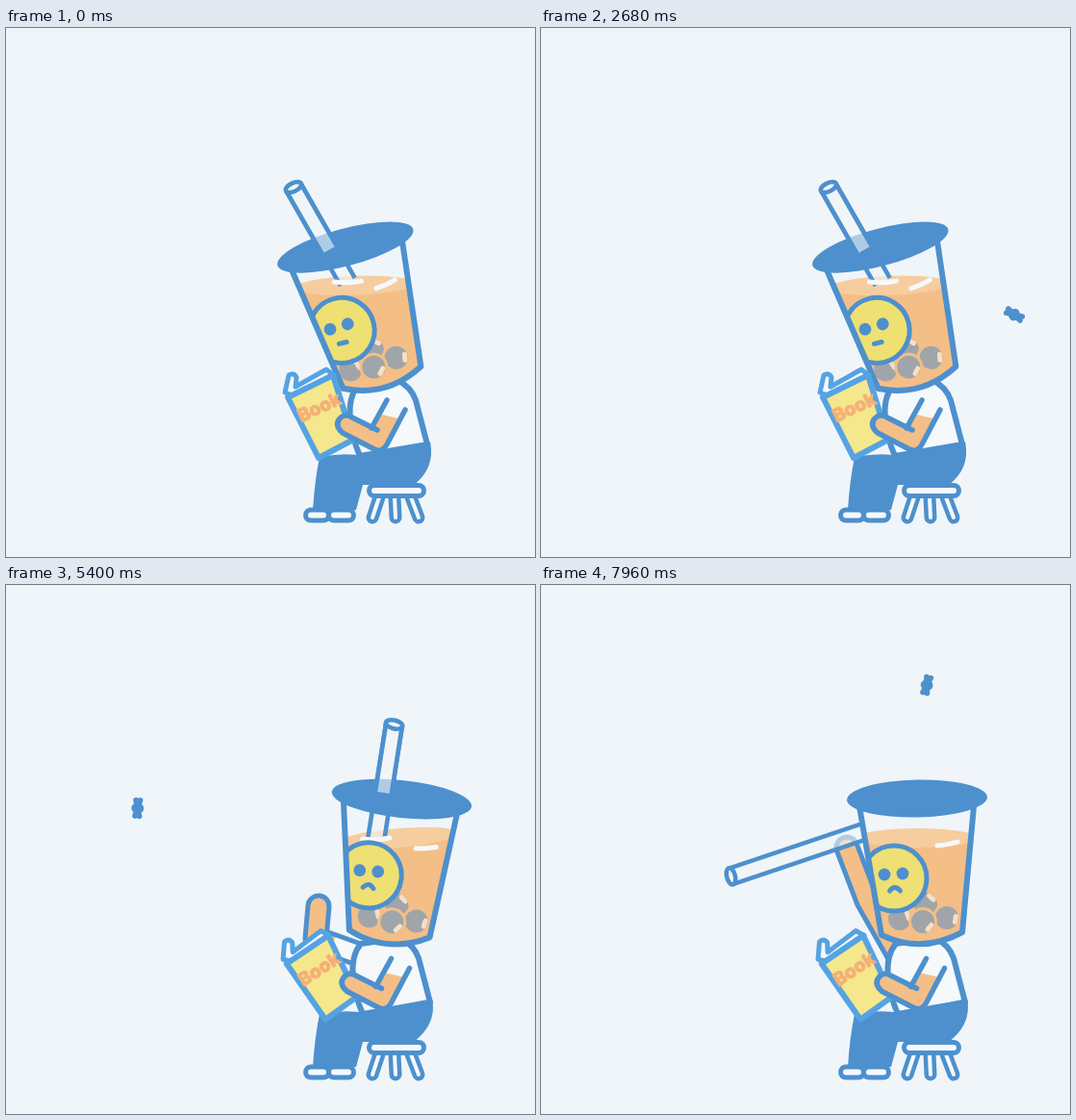
These frames come from a looping animation (550x550 px, 8 s). An HTML page with a canvas:

```html
<!DOCTYPE html>
<html lang="en">
<head>
<meta charset="utf-8">
<title>Bubble tea reader</title>
<style>
  html, body { margin: 0; height: 100%; overflow: hidden; background: #f0f5f9; }
  canvas { display: block; width: 100vw; height: 100vh; }
</style>
</head>
<body>
<canvas width="550" height="550"></canvas>
<script>
const ctx = document.querySelector('canvas').getContext('2d');
const LOOP = 8000;
const BG = '#f0f5f9', BLUE = '#4d90cd', SKY = '#55a3e2', SKIN = '#f4be87',
      FOAM = '#f6cd9f', WHITE = '#f5f9fc', LEMON = '#eee072', PAPER = '#f5e78c',
      PEARL = '#a0a5a9', LETTER = '#f5b077';
const STRAW_LENGTH = 145;
const WALL = 'M331 230L354 364Q396 384 438 361L450 230';

// Waypoints of the fly: time, x, y
const FLIGHT = [
  [0, -28, 330], [1800, 484, 204], [2240, 541, 250], [2680, 492, 298],
  [3000, 525, 275], [3400, 448, 242], [3920, 387, 257], [5400, 137, 232],
  [6100, 37, 235], [6520, 127, 258], [7580, 342, 77], [7960, 401, 104], [8300, 450, 104]];

// Raised arm: hand x, hand y, elbow x, elbow y
const ARM = {
  rest: [335, 402, 332, 404],
  wave: [316, 338, 315, 370],
  open: [325, 334, 322, 368],
  grab: [374, 205, 364, 290],
  aside: [318, 273, 339, 328],
};

const rad = deg => deg * Math.PI / 180;
const mix = (a, b, u) => a + (b - a) * u;
const blend = (a, b, u) => a.map((v, i) => mix(v, b[i], u));

function ramp(t, start, end) {
  const u = Math.max(0, Math.min(1, (t - start) / (end - start)));
  return u * u * (3 - 2 * u);
}

function flyAt(t) {
  const i = FLIGHT.findIndex((p, n) => n && t < p[0]) - 1;
  const at = n => FLIGHT[Math.max(0, Math.min(FLIGHT.length - 1, n))];
  const a = at(i), b = at(i + 1), span = b[0] - a[0], u = (t - a[0]) / span;
  const slope = (n, k) => (at(n + 1)[k] - at(n - 1)[k]) / (at(n + 1)[0] - at(n - 1)[0]) * span;
  return [1, 2].map(k =>
    a[k] * (1 + 2 * u) * (1 - u) ** 2 + slope(i, k) * u * (1 - u) ** 2 +
    b[k] * u * u * (3 - 2 * u) - slope(i + 1, k) * u * u * (1 - u));
}

function paint(shape, fill, stroke, width = 6) {
  const path = typeof shape === 'string' ? new Path2D(shape) : shape;
  if (fill) { ctx.fillStyle = fill; ctx.fill(path); }
  if (stroke) { ctx.strokeStyle = stroke; ctx.lineWidth = width; ctx.stroke(path); }
}

function tube(path, outer, inner, fill) {
  paint(path, null, BLUE, outer);
  paint(path, null, fill, inner);
}

function oval(x, y, rx, ry = rx, turn = 0) {
  const path = new Path2D();
  path.ellipse(x, y, rx, ry, rad(turn), 0, 7);
  return path;
}

function layer(draw) { ctx.save(); draw(); ctx.restore(); }

function rotateAbout(x, y, deg) {
  ctx.translate(x, y);
  ctx.rotate(rad(deg));
  ctx.translate(-x, -y);
}

function poseAt(t) {
  const turn = ramp(t, 4350, 5440), lift = ramp(t, 6560, 6950), swing = ramp(t, 6950, 7480);
  const tilt = -13.7 + 21 * turn - 7.3 * ramp(t, 5720, 7300);
  const slosh = -6 * ramp(t, 5000, 5400) * (1 - ramp(t, 5450, 6300));

  // The straw turns in the lid until it is pulled out, then around the gripping hand
  const angle = mix(mix(-29.8, 9.1, turn), -108.6, swing);
  const dir = [Math.sin(rad(angle)), -Math.cos(rad(angle))];
  const c = Math.cos(rad(tilt)), s = Math.sin(rad(tilt));
  const hole = [397 - 25.5 * c + 173 * s, 384 - 25.5 * s - 173 * c];
  const grip = blend(hole.map((v, i) => v + dir[i] * (72 * lift - 60)), [316, 263], swing);
  const tip = grip.map((v, i) => v + dir[i] * 125);

  const reach = ramp(t, 5960, 6400);
  let arm = blend(ARM.rest, ARM.wave, ramp(t, 3480, 3880));
  arm = blend(arm, ARM.open, turn);
  arm = blend(arm, ARM.grab, reach);
  arm[1] -= 40 * lift;
  arm = blend(arm, ARM.aside, swing);
  if (swing) arm[1] += 40 * lift * 0;
  return { turn, tilt, slosh, angle, tip, arm, reach, inserted: t < 6950 };
}

function drawFly(t) {
  const [x, y] = flyAt(t), [nextX, nextY] = flyAt(t + 1);
  layer(() => {
    ctx.translate(x, y);
    ctx.rotate(Math.atan2(nextY - y, nextX - x));
    paint(oval(0, 0, 6.5, 5.5), BLUE);
    paint('M-2.3 -8.2L2.3 8.2M2.3 -8.2L-2.3 8.2', null, BLUE, 5.6);
  });
}

function drawRaisedArm({ arm: [hx, hy, ex, ey], reach }) {
  const sx = 372, sy = 386, sleeve = mix(.65, .1, reach);
  tube(`M${sx} ${sy}L${ex} ${ey}L${hx} ${hy}`, 27, 17, SKIN);
  ctx.lineCap = 'butt';
  paint(`M${sx} ${sy}L${mix(sx, ex, sleeve)} ${mix(sy, ey, sleeve)}`, null, WHITE, 17);
  ctx.lineCap = 'round';
}

function drawStraw({ tip, angle }, length, withRim) {
  layer(() => {
    ctx.translate(...tip);
    ctx.rotate(rad(angle));
    ctx.lineCap = 'butt';
    paint(`M-8.5 0H8.5V${length}H-8.5Z`, 'rgba(240,245,249,.6)');
    paint(`M-8.5 0V${length}M8.5 0V${length}`, null, BLUE, 4.6);
    if (withRim) paint(oval(0, 0, 8.8, 4.4, 4), BG, BLUE, 4.6);
  });
}

function drawBody(turn) {
  layer(() => {
    ctx.translate(3 * turn, turn);
    paint('M366 372C352 388 357 420 368 445L438 433L426 387Q421 373 407 366Z', WHITE, BLUE, 6);
  });
  const hip = 441 + 2 * turn;
  paint(`M326 446Q352 441 374 445L${hip} 430C${hip + 4} 450 438 464 424 475L371 475L364 501H319Q321 470 326 446Z`, BLUE);
  tube('M317 506.5H330', 16, 6, WHITE);
  tube('M341 506.5H356', 16, 6, WHITE);
  tube('M388 488L381 509M404 488L405 509M421 488L429 509', 13, 4, WHITE);
  tube('M383 481H429', 16, 6, WHITE);
}

function drawMilk(tilt, slosh) {
  layer(() => {
    ctx.translate(391, 263);
    ctx.rotate(rad(slosh - tilt * .85));
    paint('M-95 0H95V150H-95Z', SKIN);
    paint(oval(0, 0, 63, 10), FOAM);
  });
  layer(() => {
    ctx.translate(Math.min(0, tilt * .5), 0);
    [[400, 332], [373, 347], [422, 346], [397, 350]].forEach(([x, y], i) => {
      paint(oval(x, y, 13.5), PEARL, SKIN, 3);
      layer(() => {
        ctx.translate(x, y);
        ctx.rotate(rad(30 * i - 50));
        paint('M9 -3V3', null, '#f7dfc6', 5);
      });
    });
  });
  paint('M412 271Q424 270 433 267', null, WHITE, 5);
}

function drawFace(turn) {
  const look = 1.5 * (turn - 1), half = mix(4, 5.5, turn);
  paint(oval(367, 305, 34), LEMON, BLUE, 5);
  paint(oval(357 + look, 301, 6.4), BLUE);
  paint(oval(376 + look, 300, 6.4), BLUE);
  layer(() => {
    ctx.translate(mix(365, 368, turn), 318);
    paint(`M${-half} 0Q0 ${-7 * turn} ${half} 0`, null, BLUE, 5);
  });
}

function drawCup(pose) {
  const { turn, tilt, slosh, tip, angle, inserted } = pose;
  const inHead = draw => layer(() => { rotateAbout(397, 384, tilt); draw(); });
  const insideCup = draw => layer(() => { ctx.clip(new Path2D(WALL + 'Z')); draw(); });
  const lengthTo = y => Math.max(0, Math.min(STRAW_LENGTH, (y - tip[1]) / Math.cos(rad(angle))));

  inHead(() => insideCup(() => drawMilk(tilt, slosh)));
  if (inserted) {
    const depth = lengthTo(264);
    drawStraw(pose, depth, false);
    if (depth < STRAW_LENGTH) {
      const x = tip[0] - depth * Math.sin(rad(angle));
      paint(`M${x - 14} 264Q${x} 266 ${x + 14} 263`, null, WHITE, 5);
    }
  }
  inHead(() => {
    insideCup(() => drawFace(turn));
    paint(WALL, null, BLUE, 6);
    paint(oval(391, 222, 73, 19.5, -1.2), BLUE);
  });
  if (inserted) drawStraw(pose, lengthTo(221 - .7 * tilt), true);
}

function drawBook(turn) {
  layer(() => {
    ctx.translate(6 * turn, 2 * turn);
    rotateAbout(345, 440, -8 * turn);
    paint('M290 379L294 361Q299 358 302 363L301 373L333 355L341 361L301 383Z', WHITE, SKY, 5);
    paint('M293 384L340 361L361 428L325 447Z', PAPER, SKY, 6);
    ctx.translate(326, 395);
    ctx.rotate(rad(-25));
    ctx.font = '800 19px Inter, "Open Sans", sans-serif';
    ctx.textAlign = 'center';
    ctx.textBaseline = 'middle';
    ctx.fillStyle = ctx.strokeStyle = LETTER;
    ctx.lineWidth = 1;
    ctx.fillText('Book', 0, 0);
    ctx.strokeText('Book', 0, 0);
  });
}

function drawReadingArm(turn) {
  layer(() => {
    ctx.translate(4.5 * turn, 1.5 * turn);
    paint('M391 402L408 406L396 433Q391 442 383 438L350 421Q341 413 347 406Q353 400 360 405L381 416Z', SKIN);
    paint('M396 387L380 416M386 418L360 405Q353 400 347 406Q341 413 350 421L383 438Q391 442 396 433L415 397', null, BLUE, 5.5);
  });
}

function frame(now) {
  const t = now % LOOP, pose = poseAt(t);
  ctx.fillStyle = BG;
  ctx.fillRect(0, 0, 550, 550);
  ctx.lineCap = ctx.lineJoin = 'round';
  drawFly(t);
  if (t > 3480) drawRaisedArm(pose);
  if (!pose.inserted) drawStraw(pose, STRAW_LENGTH, true);
  drawBody(pose.turn);
  drawCup(pose);
  drawBook(pose.turn);
  drawReadingArm(pose.turn);
  requestAnimationFrame(frame);
}
requestAnimationFrame(frame);
</script>
</body>
</html>
```
